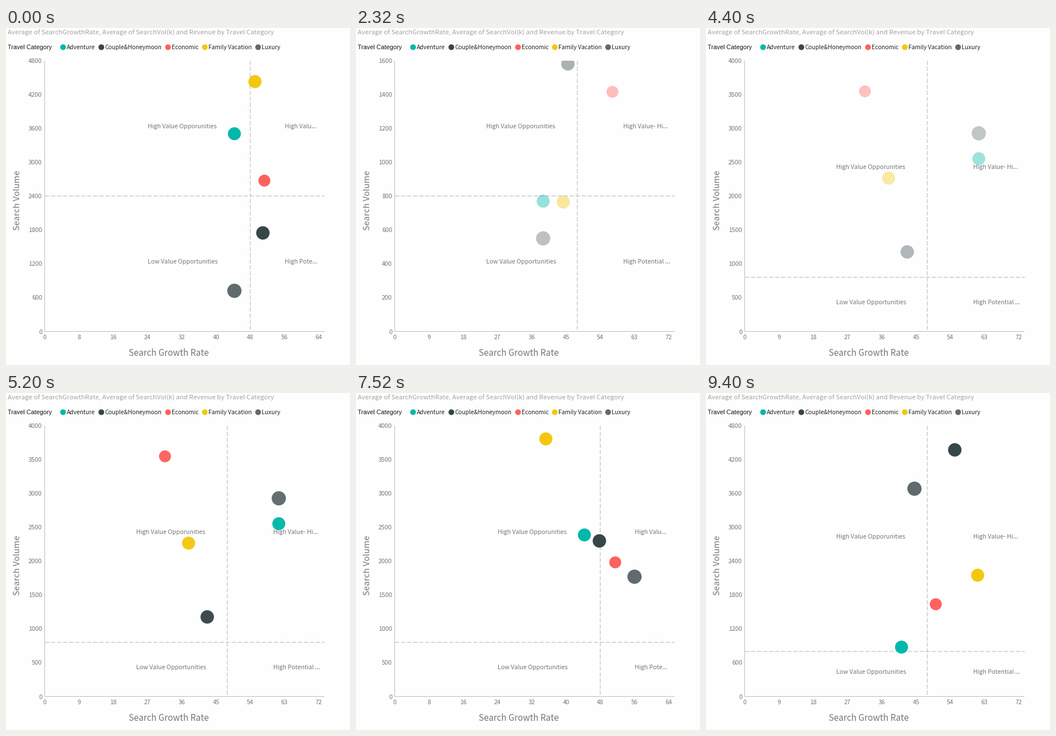
Recreate the animation shown at these times as a matplotlib script. Size 600 by 588 pixels, loop 9960 ms.

```python
import math

import matplotlib.pyplot as plt
from matplotlib.animation import FuncAnimation
from matplotlib.patches import Circle, Rectangle

WIDTH, HEIGHT, DPI = 600, 588, 100
LOOP_MS, STEP_MS, FADE_MS = 9960, 40, 1360
LEFT, RIGHT, LAST_TICK, TOP, BOTTOM = 67.5, 555.5, 545.5, 57, 529.5
DIVISIONS = 8
GROWTH_SPLIT, VOLUME_SPLIT = 48, 800
SANS, ARIAL = "Noto Sans CJK JP", "Liberation Sans"
GREY, AXIS, DASH = "#777777", "#bdbabf", "#cdc9d3"

CATEGORIES = [  # name, colour, bubble radius
    ("Adventure", "#01b8aa", 11.3),
    ("Couple&Honeymoon", "#374649", 11.7),
    ("Economic", "#fd625e", 10.4),
    ("Family Vacation", "#f2c80f", 11.4),
    ("Luxury", "#5f6b6d", 12.4),
]

# Start in ms: (growth, volume) of each category
SCENES = {
    0: [(44.3, 3505), (50.95, 1747), (51.3, 2674), (49.1, 4429), (44.3, 721)],
    1800: [(39, 770), (45.5, 1581), (57.2, 1416), (44.3, 765), (39, 550)],
    3920: [(61.5, 2552), (42.7, 1175), (31.6, 3547), (37.8, 2265), (61.5, 2927)],
    6000: [(44.3, 2386), (47.8, 2298), (51.5, 1981), (35.3, 3805), (56, 1769)],
    8000: [(41.2, 875), (55.2, 4371), (50.2, 1635), (61.2, 2149), (44.6, 3683)],
}
SHORT_LABELS = {8: ("High Valu...", "High Pote..."),
                9: ("High Value- Hi...", "High Potential ...")}

fig = plt.figure(figsize=(WIDTH / DPI, HEIGHT / DPI), dpi=DPI, facecolor="#fefefe")
ax = fig.add_axes([0, 0, 1, 1])
ax.set_xlim(0, WIDTH)
ax.set_ylim(HEIGHT, 0)
ax.axis("off")


def px(size):
    return size * 72 / DPI


def text(x, y, label="", size=10.6, color=GREY, font=SANS, **kwargs):
    return ax.text(x, y, label, fontsize=px(size), color=color, family=font,
                   va="baseline", **kwargs)


def line(xs, ys, color=AXIS, width=1, **kwargs):
    return ax.plot(xs, ys, color=color, lw=px(width), **kwargs)[0]


def across(share):
    return LEFT + share * (LAST_TICK - LEFT)


def up(share):
    return BOTTOM - share * (BOTTOM - TOP)


def draw_legend(x=99.5, y=33.5):
    text(3, 37, "Travel Category", 10.8, "#111111", ARIAL)
    for name, color, _ in CATEGORIES:
        ax.add_patch(Circle((x, y), 5, fc=color, lw=0))
        label = text(x + 6, y + 3.7, name, 10.2, "#222222")
        x = label.get_window_extent().x1 + 11.3


# Fixed parts
text(3, 11.6, "Average of SearchGrowthRate, Average of SearchVol(k) and Revenue by "
     "Travel Category", 11.42, "#a3a3a3")
draw_legend()
text(284, 572.5, "Search Growth Rate", 15.1, ha="center")
text(24, 300.5, "Search Volume", 15, ha="center", rotation=90, rotation_mode="anchor")
line([LEFT, LEFT], [TOP, BOTTOM], snap=False, solid_capstyle="butt")
line([LEFT, RIGHT], [BOTTOM, BOTTOM], snap=False, solid_capstyle="butt")

# Parts that follow the scene
ticks = range(DIVISIONS + 1)
x_ticks = [text(across(i / DIVISIONS), 542.6, ha="center") for i in ticks]
y_ticks = [text(63, up(i / DIVISIONS) + 4, size=10.8, ha="right") for i in ticks]
dashed = dict(color=DASH, width=1.5, ls=(0, (5, 2)), dash_capstyle="butt")
v_line = line([LEFT, LEFT], [TOP, BOTTOM], **dashed)
h_line = line([LEFT, RIGHT], [TOP, TOP], **dashed)
quadrants = [text(0, 0, label) for label in
             ("High Value Opporunities", "Low Value Opportunities", "", "")]

plot_area = Rectangle((LEFT, TOP), RIGHT - LEFT, BOTTOM - TOP, transform=ax.transData)
bubbles = []
for _, color, radius in CATEGORIES:
    bubble = ax.add_patch(Circle((0, 0), radius, fc=color, lw=0, zorder=4))
    bubble.set_clip_path(plot_area)
    bubbles.append(bubble)


def place_quadrants(split_x, split_y, short_labels):
    v_line.set_xdata([split_x, split_x])
    h_line.set_ydata([split_y, split_y])
    corners = [(x, y) for x in ((LEFT + split_x) / 2, (split_x + LAST_TICK) / 2)
               for y in ((TOP + split_y) / 2, (split_y + BOTTOM) / 2)]
    for label, corner in zip(quadrants, corners):
        label.set_position(corner)
    for label, content in zip(quadrants[2:], short_labels):
        label.set_text(content)


def update(frame):
    now = frame * STEP_MS
    start = max(time for time in SCENES if time <= now)
    points = SCENES[start]

    # Both axes scale to the largest value in the scene
    growths, volumes = zip(*points)
    x_step = math.ceil(max(growths) / DIVISIONS) + 1
    y_step = math.ceil(max(volumes) / DIVISIONS / 100) * 100
    x_max, y_max = x_step * DIVISIONS, y_step * DIVISIONS
    for i in ticks:
        x_ticks[i].set_text(str(i * x_step))
        y_ticks[i].set_text(str(i * y_step))

    volume_split = VOLUME_SPLIT if start else y_max / 2
    place_quadrants(across(GROWTH_SPLIT / x_max), up(volume_split / y_max),
                    SHORT_LABELS[x_step])

    alpha = min(1, (now - start + STEP_MS) / FADE_MS) if start else 1
    for bubble, (growth, volume) in zip(bubbles, points):
        bubble.center = across(growth / x_max), up(volume / y_max)
        bubble.set_alpha(alpha)
    return bubbles


animation = FuncAnimation(fig, update, frames=LOOP_MS // STEP_MS, interval=STEP_MS,
                          repeat=True, repeat_delay=0)
plt.show()
```
